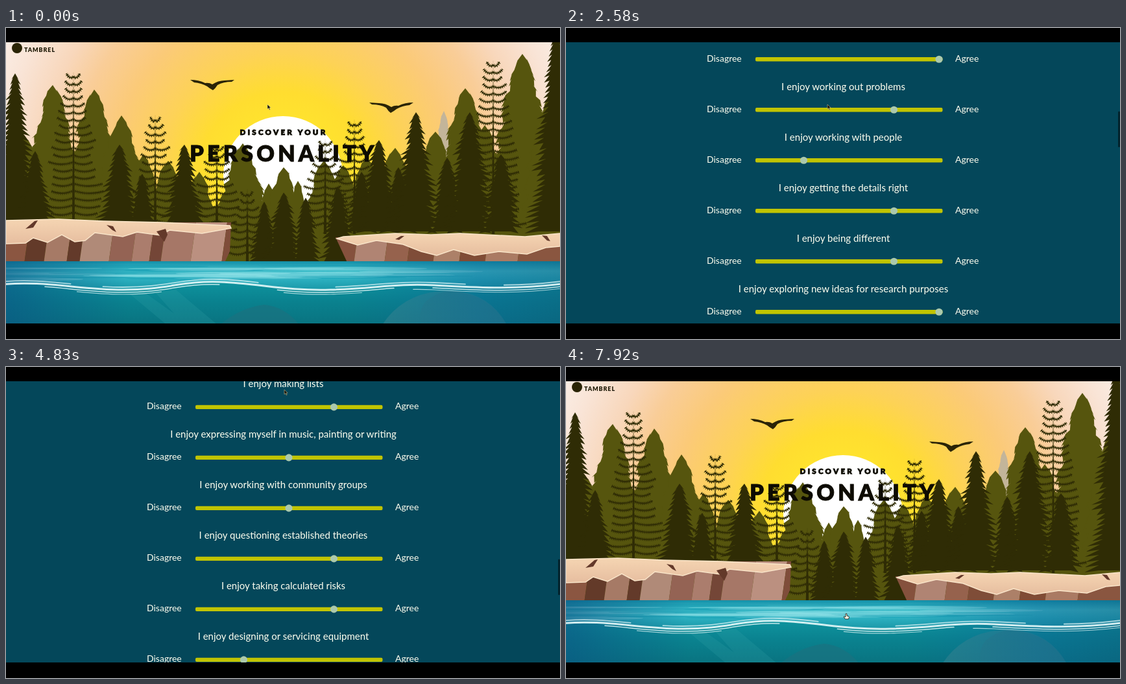
An HTML page for the animation above (8000 ms loop, 854 by 480 pixels).

```html
<!DOCTYPE html>
<html lang="en">
<head>
<meta charset="utf-8">
<title>Discover your personality</title>
<style>
  html, body { margin: 0; width: 100%; height: 100%; overflow: hidden; background: #000; }
  svg { display: block; width: 100%; height: 100%; font-family: Lato, sans-serif; }
  .black { font-weight: 900; }
  .mid { text-anchor: middle; }
  .title { font-weight: 900; text-anchor: middle; stroke: #0d0b02; stroke-width: .8px; }
</style>
</head>
<body>
<svg id="stage" viewBox="0 0 854 480"></svg>
<script>
const LOOP = 8000, PAGE_END = 3412, MAX_SCROLL = 2956;
const OLIVE = '#56550e', DARK = '#2f2c05', CREAM = '#fffff0', TEAL = '#04475a';

// Slider value (1-5), then the rest of "I enjoy ..."
const QUESTIONS = `4working out how to get things done efficiently
4helping others to learn
3working with numbers
5finding out how things work
4working out problems
2working with people
4getting the details right
4being different
5exploring new ideas for research purposes
4working outdoors
3leading a team
4following clear instructions
5learning new things
4using my imagination in my work
2persuading people to do or to buy something
4organising things, people and events
4providing care for people in some way
5making decisions
4designing new things
3listening to people
4making lists
3expressing myself in music, painting or writing
3working with community groups
4questioning established theories
4taking calculated risks
2designing or servicing equipment
4keeping accurate records
3performing in front of others
4teaching people new skills
4analysing information
3starting new projects
3working to set procedures
2using hand/machine tools to make things
2being involved in a community arts project
2giving advice on grants or benefits`.split('\n');

let seed = 11;
const rnd = () => (seed = seed * 16807 % 2147483647) / 2147483647;
const rect = (x, y, w, h, fill, extra = '') =>
  `<rect x="${x}" y="${y}" width="${w}" height="${h}" fill="${fill}" ${extra}/>`;
const path = (d, fill, extra = '') => `<path d="${d}" fill="${fill}" ${extra}/>`;
const ellipse = (cx, cy, rx, ry, fill, extra = '') =>
  `<ellipse cx="${cx}" cy="${cy}" rx="${rx}" ry="${ry}" fill="${fill}" ${extra}/>`;
const label = (x, y, size, text, fill, cls = '', spacing = 0) =>
  `<text x="${x}" y="${y}" font-size="${size}" fill="${fill}" class="${cls}" letter-spacing="${spacing}">${text}</text>`;
const layer = (speed, content) => `<g data-speed="${speed}">${content}</g>`;
const stops = list => list.map(([o, c, a = 1]) =>
  `<stop offset="${o}" stop-color="${c}" stop-opacity="${a}"/>`).join('');

// Solid conifer; notch is how far the outline cuts in between branches.
function pine(x, top, base, width, fill, notch) {
  const n = Math.round((base - top) / 8);
  const edge = side => {
    const points = [];
    for (let i = 1; i <= n; i++) {
      const y = top + (base - top) * i / n;
      const half = 1.5 + width / 2 * (i / n) ** .65 * (.72 + .4 * rnd());
      points.push(`${x + side * half} ${y + 2}`, `${x + side * half * notch} ${y - 1}`);
    }
    return points;
  };
  return path(`M${x} ${top}L${edge(1).join('L')}L${edge(-1).reverse().join('L')}Z`, fill);
}

// Open conifer with a visible trunk and needle-fringed branches.
function fir(x, top, base, width) {
  let d = '';
  for (let y = top + 7; y < base - 8; y += 11) {
    const t = (y - top) / (base - top);
    for (const side of [-1, 1]) {
      const reach = side * width / 2 * Math.min(1, .22 + 1.2 * t) * (.75 + .4 * rnd());
      d += `M${x} ${y}q${reach * .5} ${5 + 4 * t} ${reach} ${8 * t - 5}`;
    }
  }
  return path(`M${x} ${top - 3}L${x - 2.2} ${base}h4.4Z`, DARK) +
    path(d, 'none', `stroke="${DARK}" stroke-width="1.8"`) +
    path(d, 'none', `stroke="${DARK}" stroke-width="5" stroke-dasharray="1 1.8"`);
}

const bird = (x, y, flip) => path(
  'M-33-8Q-20-8-10-3Q-4-4 1-1Q10-7 20-7L35-8L31-5Q18-5 9 0Q6 5 2 8L-3 5L-7 2Q-16-3-27-4Z',
  '#2a2407', `transform="translate(${x} ${y}) scale(${flip} 1)"`);

function sky() {
  return rect(0, 0, 854, 480, 'url(#sky)') + '<circle cx="427" cy="228" r="92" fill="#fff"/>';
}

function forest() {
  const back = [[28, 165, 90], [72, 88, 122], [136, 95, 118], [178, 135, 105], [212, 195, 80],
    [250, 205, 80], [298, 222, 70], [365, 178, 100], [405, 240, 40], [428, 215, 75],
    [450, 236, 40], [490, 205, 80], [520, 212, 80], [556, 200, 80], [600, 185, 90],
    [662, 160, 95], [708, 93, 122], [738, 150, 95], [796, 40, 140], [842, 95, 110]];
  const front = [[14, 70, 80], [45, 190, 64], [175, 180, 78], [210, 225, 50], [275, 180, 74],
    [398, 268, 50], [428, 254, 66], [462, 262, 50], [512, 245, 60], [548, 222, 56],
    [575, 173, 76], [605, 215, 56], [632, 130, 86], [680, 200, 60], [715, 130, 92],
    [763, 195, 70], [848, 2, 90]];
  const firs = [[104, 68, 84], [230, 135, 72], [325, 180, 74], [372, 250, 64],
    [492, 172, 70], [537, 142, 72], [751, 50, 90]];
  return pine(675, 128, 300, 50, '#c3b59a', .8) +
    rect(0, 275, 854, 110, OLIVE) +
    back.map(([x, y, w]) => pine(x, y, 330, w, OLIVE, .88)).join('') +
    firs.map(([x, y, w]) => fir(x, y, y > 240 ? 362 : 318, w)).join('') +
    front.map(([x, y, w]) => pine(x, y, y > 240 ? 362 : 315, w, DARK, .55)).join('');
}

// Facets: [left edge, colour], each running to the next one.
function facets(list, end) {
  return list.map(([x, color], i) => {
    const next = i + 1 < list.length ? list[i + 1][0] : end;
    return path(`M${x + 5} 300H${next + 5}L${next - 4} 364H${x - 4}Z`, color);
  }).join('');
}

function cliffs() {
  const left = 'M0 300H347L345 345L336 364H0Z', right = 'M508 323H854V364H527Z';
  return `<clipPath id="rock"><path d="${left}${right}"/></clipPath><g clip-path="url(#rock)">` +
    facets([[-8, '#8b5641'], [32, '#633a29'], [62, '#a67a66'], [97, '#633a2a'], [117, '#b08a78'],
      [162, '#946354'], [197, '#ab7d6d'], [224, '#744637'], [242, '#a67767'], [288, '#bb9080'],
      [336, '#7f4d3a']], 356) +
    facets([[500, '#85513d'], [540, '#b08473'], [587, '#96624d'], [622, '#7f4d38'],
      [662, '#ac8068'], [702, '#804b35'], [742, '#aa7a63'], [792, '#8a5640']], 870) + '</g>' +
    path('M0 297L80 295L150 298L240 300L345 305L347 309L302 317L252 312L238 320L202 315L180 322L137 316L122 328L106 330L86 319L64 331L42 324L30 332L0 333Z',
      'url(#sand)', 'stroke="#f9e4c8" stroke-width="1.5"') +
    path('M510 325L520 322L600 317L655 319L700 317L800 322L854 317V337L832 339L803 349L760 345L722 351L690 342L664 351L640 345L612 334L571 328L542 335Z',
      'url(#sand)', 'stroke="#f9e4c8" stroke-width="1.5"') +
    path('M30 310l14-12l5-1l-7 11zM155 304l9 8l6 3l-5-9zM232 314l14-4l3 9l-5 11zM826 320l8 8l5 1l-5-8zM600 326l9-5l5 0l-8 6z', '#63392a');
}

function water() {
  const wave = 'M-10 396C60 389 110 404 180 404S270 390 330 392S430 406 500 404S600 394 660 397S780 405 864 394';
  const ripple = (dy, width, dashes, alpha) => path(wave, 'none',
    `stroke="#e6fafa" stroke-width="${width}" stroke-dasharray="${dashes}" stroke-linecap="round" opacity="${alpha}" transform="translate(0 ${dy})"`);
  let out = rect(0, 360, 854, 120, 'url(#surface)');
  for (let i = 0; i < 30; i++)
    out += ellipse(rnd() * 640, 365 + rnd() * 25, 60 + rnd() * 110, .8 + rnd() * 2,
      i % 3 ? '#9ce6ea' : '#1198ae', 'opacity=".4"');
  return out + path(wave + 'V480H-10Z', 'url(#deep)') +
    path('M230 408L262 404L340 470H285ZM190 410L212 407L300 470H262Z', '#3aa5a8', 'opacity=".2"') +
    path('M330 458Q360 432 398 427Q430 430 452 458Z', '#1a7280', 'opacity=".7"') +
    path('M580 458Q610 412 668 406Q740 400 772 458Z', '#3d8791', 'opacity=".55"') +
    path('M640 458Q630 420 676 407Q740 404 772 458Z', '#2f7d88', 'opacity=".5"') +
    rect(0, 360, 854, 120, 'url(#edges)') +
    ripple(0, 3, 'none', .9) + ripple(4, 1.5, '0 70 270 90 180 60 300', .85) +
    ripple(-4, 1.8, '110 50 240 120 200 60', .7) + ripple(7, 1.2, '0 120 130 190 120 80 140', .7);
}

function question(line, i) {
  const y = 78 * i;
  return label(427.5, 615 + y, 15, 'I enjoy ' + line.slice(1), CREAM, 'mid') +
    label(217, 649 + y, 14, 'Disagree', CREAM) + label(600, 649 + y, 14, 'Agree', CREAM) +
    rect(292, 642.5 + y, 288.5, 6.4, '#c1c400', 'rx="2"') +
    ellipse(297 + 69.5 * (line[0] - 1), 645.7 + y, 5.6, 5.6, '#abc9ad');
}

function form() {
  return rect(0, 456, 854, PAGE_END - 456, TEAL) + rect(0, PAGE_END, 854, 300, '#fffff4') +
    label(44, 528, 26, 'View Detailed Results', CREAM, 'black') +
    label(44, 551, 7.5, 'Learn how your personality type influences many areas of your life.', CREAM) +
    QUESTIONS.map(question).join('') +
    rect(399, 3328.5, 57, 17, '#fffff4', 'rx="8.5"') +
    label(427.8, 3339.5, 7, 'SUBMIT', '#0b4a4c', 'mid', .8) +
    label(9, 3383, 10, '© Tambrel Teaching Partnership', '#93ac72', '', .93) +
    rect(822, 3376, 20, 23, '#fffff4', 'rx="9.5"') +
    path('M829 3390.5h6l-3-6z', '#0b4a4c');
}

const stage = document.getElementById('stage');
stage.innerHTML = `<defs>
  <radialGradient id="sky" gradientUnits="userSpaceOnUse" cx="427" cy="228" r="480">${stops([
    [.18, '#ffe32e'], [.27, '#ffdd30'], [.4, '#fdd257'], [.55, '#fbca78'], [.68, '#f9cd98'],
    [.78, '#f8d7bb'], [.9, '#f9e4d6'], [1, '#faeee6']])}</radialGradient>
  <linearGradient id="sand" x2="0" y2="1">${stops([[0, '#f5d5b2'], [1, '#e6bd9f']])}</linearGradient>
  <linearGradient id="surface" gradientUnits="userSpaceOnUse" x1="0" x2="0" y1="360" y2="410">${stops([
    [0, '#128fa8'], [.3, '#43bfcb'], [.55, '#2cb0c0'], [1, '#128f9f']])}</linearGradient>
  <linearGradient id="deep" gradientUnits="userSpaceOnUse" x1="0" x2="0" y1="395" y2="460">${stops([
    [0, '#0e919c'], [.4, '#0a828f'], [1, '#09727f']])}</linearGradient>
  <linearGradient id="edges">${stops([
    [0, '#0a5583', .65], [.22, '#0a5583', 0], [.62, '#0a6494', 0], [.85, '#0a6494', .45], [1, '#0a5a80', .5]])}</linearGradient>
</defs>` +
  layer(.44, sky()) +
  layer(.8, bird(317, 88, 1) + bird(595, 123, -1)) +
  layer(.67, forest()) +
  layer(.835, label(428, 164.5, 11.5, 'DISCOVER YOUR', '#0d0b02', 'title', 3.3) +
    label(428, 206, 34, 'PERSONALITY', '#0d0b02', 'title', 5.2)) +
  layer(.895, cliffs()) +
  layer(.885, water()) +
  layer(1, ellipse(17, 31, 8, 8, '#2a2405') + label(28, 37, 9, 'TAMBREL', '#1c1804', 'black', .9) + form()) +
  rect(851, 0, 3, 55, '#000', 'id="thumb" rx="1.5" opacity=".5"') +
  path('M0 0V7.2L1.8 5.6L3 8.4L4.2 7.9L3 5.2L5.2 5Z', '#15120a', 'id="arrow" stroke="#e8d9a0" stroke-width=".5"') +
  path('M-1-4Q0-5 1-4V-1L4 0Q5 1 3.5 4H-1.5L-4 .5Q-3.5-.5-1 1Z', '#fffbe8', 'id="hand" stroke="#15120a" stroke-width=".8"') +
  rect(0, 0, 854, 22, '#000') + rect(0, 456, 854, 24, '#000');

const layers = [...stage.querySelectorAll('[data-speed]')];
const thumb = stage.querySelector('#thumb');
const arrow = stage.querySelector('#arrow');
const hand = stage.querySelector('#hand');

// [time, value] pairs, linear in between.
const SCROLL = [[0, 0], [350, 0], [900, 60], [1330, 164], [2580, 831], [4080, 1528], [4830, 2143],
  [5790, 2960], [5920, 3037], [6060, 3000], [6200, 2972], [6400, MAX_SCROLL], [7579, MAX_SCROLL], [7580, 0], [LOOP, 0]];
const CURSOR_X = [[0, 403], [2900, 403], [3400, 429], [6600, 429], [7200, 432], [LOOP, 432]];
const CURSOR_Y = [[0, 118], [2900, 118], [3400, 35], [6600, 35], [7200, 385], [LOOP, 385]];

function at(keys, t) {
  const i = keys.findIndex(k => k[0] > t);
  const [t0, a] = keys[i - 1], [t1, b] = keys[i];
  return a + (b - a) * (t - t0) / (t1 - t0);
}

function draw(now) {
  const t = now % LOOP, scroll = at(SCROLL, t);
  for (const el of layers) el.setAttribute('transform', `translate(0 ${-scroll * el.dataset.speed})`);

  const height = 55.5 - Math.max(0, scroll - MAX_SCROLL) * .12;
  thumb.setAttribute('height', height);
  thumb.setAttribute('y', Math.min(22 + scroll * 434 / 3390, 456 - height));
  thumb.setAttribute('opacity', scroll > 0 ? .5 * Math.min(1, Math.max(0, (7100 - t) / 250)) : 0);

  const place = `translate(${at(CURSOR_X, t)} ${at(CURSOR_Y, t)})`;
  arrow.setAttribute('transform', place);
  hand.setAttribute('transform', place);
  arrow.setAttribute('visibility', t < 7150 ? 'visible' : 'hidden');
  hand.setAttribute('visibility', t < 7150 ? 'hidden' : 'visible');
  requestAnimationFrame(() => draw(performance.now() - start));
}
const start = performance.now();
draw(0);
</script>
</body>
</html>
```
